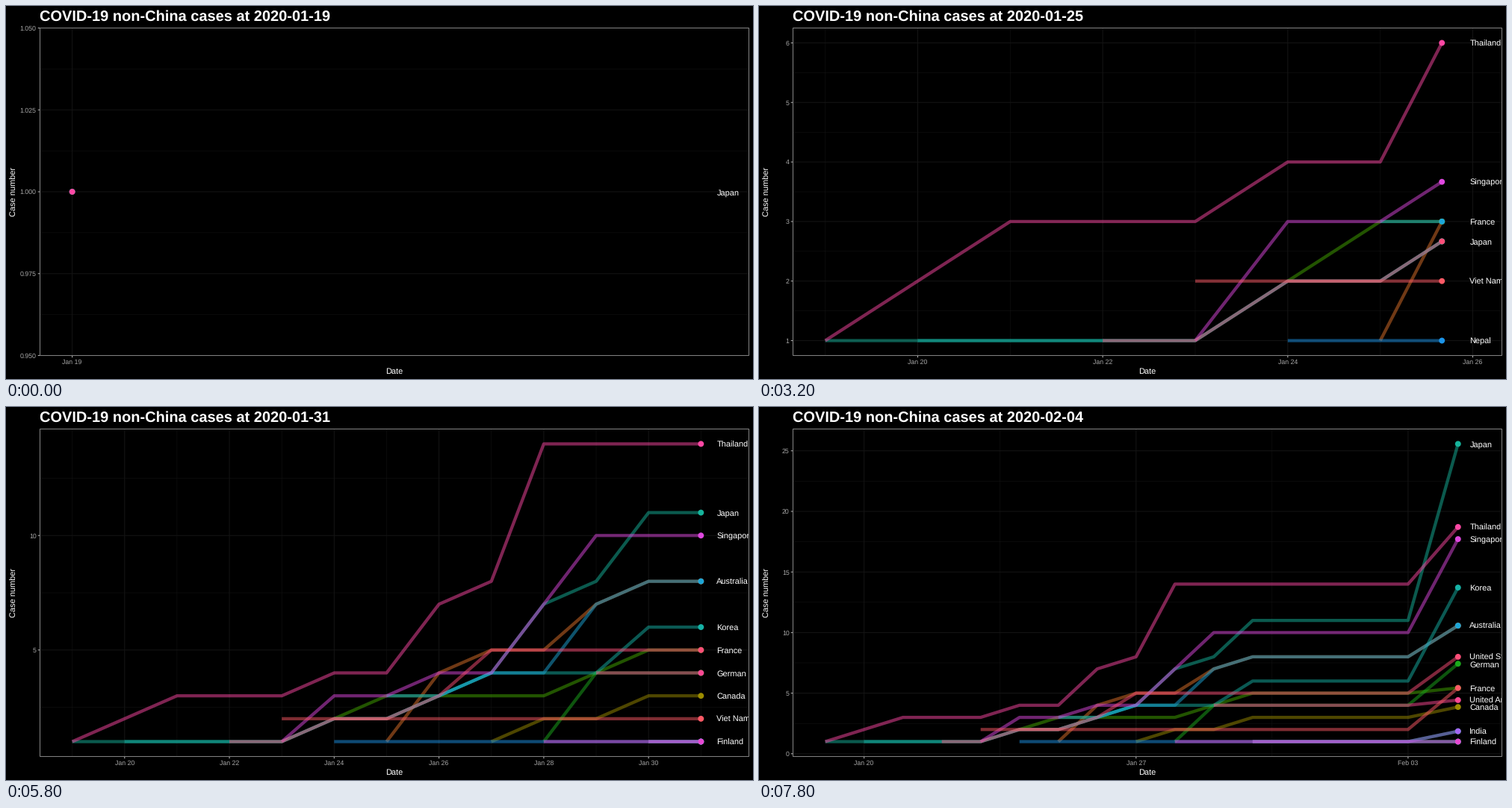
Recreate the animation shown at these times as a matplotlib script. Size 1000 by 500 pixels, loop 8000 ms.

```python
import math
from itertools import count

import matplotlib.pyplot as plt
import numpy as np
from matplotlib.animation import FuncAnimation
from matplotlib.patches import Circle, Rectangle

plt.rcParams["font.family"] = "Liberation Sans"
plt.rcParams["text.hinting"] = "no_hinting"

W, H = 1000, 500
LEFT, RIGHT, TOP, BOTTOM = 45.5, 994.5, 29.5, 468.5
PX = 0.72               # points per pixel at 100 dpi
THIN = 1.07             # pixel width of border, ticks and major grid
FRAMES, INTERVAL = 40, 200
PER_DAY = 99 / 41       # animation frames per day
HOLD, LAST = 15, 18     # counts stay flat until HOLD, next report on LAST
LABEL_GAP = 0.3         # days between the newest point and its label

# name: colour, first day after Jan 19, daily counts, count on LAST
COUNTRIES = {
    "Australia": ("#e0722a", 6, [1, 4, 5, 5, 7, 8], 14),
    "Canada": ("#9c8c00", 8, [1, 2, 2, 3], 5),
    "Finland": ("#55a000", 11, [1], 1),
    "France": ("#45a800", 5, [2, 3, 3, 3, 3, 4, 5], 6),
    "German": ("#1caa1c", 9, [1, 4], 12),
    "India": ("#14b06c", 11, [1], 3),
    "Japan": ("#16b49c", 0, [1, 1, 1, 1, 1, 2, 2, 3, 4, 7, 8, 11], 45),
    "Korea": ("#16b2a6", 1, [1, 1, 1, 1, 2, 2, 3, 4, 4, 4, 6], 24),
    "Malaysia": ("#1ca6d8", 6, [3, 3, 4, 4, 7, 8], 14),
    "Nepal": ("#1c94e8", 5, [1], 1),
    "Philippines": ("#a566f5", 11, [1], 3),
    "Singapore": ("#df48e0", 4, [1, 3, 3, 4, 4, 7, 10], 28),
    "Sri Lanka": ("#e648d2", 9, [1], 1),
    "Thailand": ("#ff48a4", 0, [1, 2, 3, 3, 3, 4, 4, 7, 8, 14], 25),
    "United Arab Emirates": ("#ff4894", 10, [4], 5),
    "United States": ("#ff4e78", 3, [1, 1, 2, 2, 3, 5], 12),
    "Viet Nam": ("#ff5a66", 4, [2], 10),
}
# Australia gives way to these when labels collide
FIRST_LABELS = ["Finland", "France", "German", "India", "Japan", "Korea"]
LABEL_ORDER = FIRST_LABELS + [n for n in COUNTRIES if n not in FIRST_LABELS]

KEY_DAYS = list(range(HOLD + 1)) + [LAST]
KEY_FRAMES = [round(d * PER_DAY) for d in KEY_DAYS]


def series(start, counts, final):
    days = list(range(start, HOLD + 1)) + [LAST]
    held = counts + [counts[-1]] * (len(days) - 1 - len(counts))
    return np.array(days, float), np.array(held + [final], float)


SERIES = {n: series(*spec[1:]) for n, spec in COUNTRIES.items()}


def nice_breaks(lo, hi, m=5):
    """Extended Wilkinson axis labelling."""
    qs = (1, 5, 2, 2.5, 4, 3)
    span = hi - lo
    best, result = -2.0, None

    def score(simple, cover, dense):
        return 0.25 * simple + 0.2 * cover + 0.5 * dense + 0.05

    for j in count(1):
        for i, q in enumerate(qs):
            base = 1 - i / (len(qs) - 1) - j
            if score(base + 1, 1, 1) < best:
                return result
            for k in count(2):
                dense_max = 2 - (k - 1) / (m - 1) if k >= m else 1
                if score(base + 1, 1, dense_max) < best:
                    break
                for z in count(math.ceil(math.log10(span / (k + 1) / j / q))):
                    step = j * q * 10.0 ** z
                    width = step * (k - 1)
                    extra = max(0, width - span) / 2
                    cover_max = 1 - extra ** 2 / (0.1 * span) ** 2
                    if score(base + 1, cover_max, dense_max) < best:
                        break
                    first = math.floor(hi / step) * j - (k - 1) * j
                    for start in range(first, math.ceil(lo / step) * j + 1):
                        a = start * step / j
                        b = a + width
                        zero = start % j == 0 and a <= 0 <= b
                        cover = 1 - 0.5 * ((hi - b) ** 2 + (lo - a) ** 2) / (0.1 * span) ** 2
                        ratio = (k - 1) / width * (max(b, hi) - min(a, lo)) / (m - 1)
                        s = score(base + zero, cover, 2 - max(ratio, 1 / ratio))
                        if s > best:
                            best, result = s, [a + step * n for n in range(k)]


def number_labels(values):
    digits = next(d for d in range(6)
                  if all(abs(round(v, d) - v) < 1e-6 for v in values))
    return [f"{v:.{digits}f}" for v in values]


def day_breaks(hi):
    step = 1 if hi <= 5 else 2 if hi <= 13 else 7
    first = (0 if step == 1 else 1) - step
    return [first + step * n for n in range(int(hi / step) + 4)]


def month_day(day):
    d = 19 + day
    return (1, d) if d <= 31 else (2, d - 31)


def day_label(day):
    month, d = month_day(day)
    return f"{('Jan', 'Feb')[month - 1]} {d:02d}"


def midpoints(breaks):
    half = (breaks[1] - breaks[0]) / 2
    return [breaks[0] - half] + [b + half for b in breaks]


fig = plt.figure(figsize=(W / 100, H / 100), dpi=100, facecolor="black")
ax = fig.add_axes([0, 0, 1, 1])
panel = Rectangle((LEFT / W, 1 - BOTTOM / H), (RIGHT - LEFT) / W, (BOTTOM - TOP) / H,
                  transform=fig.transFigure)


def line(xs, ys, color, width=THIN, **kw):
    ax.plot(xs, ys, color=color, lw=width * PX, solid_capstyle="butt",
            solid_joinstyle="round", snap=False, **kw)


def text(x, y, s, size, color="white", **kw):
    return ax.text(x, y, s, fontsize=size * PX, color=color, va="baseline", **kw)


def draw_axes(xpix, ypix, xbreaks, ybreaks):
    def in_x(v):
        return LEFT - 0.01 <= xpix(v) <= RIGHT + 0.01

    def in_y(v):
        return TOP - 0.01 <= ypix(v) <= BOTTOM + 0.01

    for marks, width in ((midpoints, THIN / 2), (list, THIN)):
        for v in filter(in_y, marks(ybreaks)):
            line([LEFT, RIGHT], [ypix(v)] * 2, "#141414", width, zorder=1)
        for v in filter(in_x, marks(xbreaks)):
            line([xpix(v)] * 2, [TOP, BOTTOM], "#141414", width, zorder=1)

    for v, label in zip(ybreaks, number_labels(ybreaks)):
        if in_y(v):
            line([LEFT - 2.75, LEFT], [ypix(v)] * 2, "#b3b3b3", zorder=6)
            text(40.6, ypix(v) + 3.3, label, 8.8, "#a8a8a8", ha="right")
    for v in filter(in_x, xbreaks):
        line([xpix(v)] * 2, [BOTTOM, BOTTOM + 2.75], "#b3b3b3", zorder=6)
        text(xpix(v), 480, day_label(v), 8.8, "#a8a8a8", ha="center")

    ax.add_patch(Rectangle((LEFT, TOP), RIGHT - LEFT, BOTTOM - TOP, fill=False,
                           ec="#7f7f7f", lw=THIN * PX, snap=False, zorder=6))
    text((LEFT + RIGHT) / 2, 493, "Date", 11, ha="center")
    text(14, (TOP + BOTTOM) / 2, "Case number", 11, ha="center",
         rotation=90, rotation_mode="anchor")


def draw(frame):
    ax.clear()
    ax.set(xlim=(0, W), ylim=(H, 0))
    ax.axis("off")

    now = float(np.interp(frame, KEY_FRAMES, KEY_DAYS))
    paths = {}
    for name, (days, counts) in SERIES.items():
        if days[0] <= now:
            past = days < now
            paths[name] = (np.append(days[past], now),
                           np.append(counts[past], np.interp(now, days, counts)))

    lo = min(ys.min() for _, ys in paths.values())
    hi = max(ys.max() for _, ys in paths.values())
    if lo == hi:
        lo, hi = lo - 0.05, hi + 0.05
        pad = 0
    else:
        pad = (hi - lo) * 0.05
    xmax = now + LABEL_GAP

    def xpix(d):
        return LEFT + (RIGHT - LEFT) * (d / xmax + 0.05) / 1.1

    def ypix(v):
        return BOTTOM - (BOTTOM - TOP) * (v - lo + pad) / (hi - lo + 2 * pad)

    draw_axes(xpix, ypix, day_breaks(xmax), nice_breaks(lo, hi))

    for name, (xs, ys) in paths.items():
        color = COUNTRIES[name][0]
        if len(xs) > 1:
            line(xpix(xs), ypix(ys), color, 4.27, alpha=0.5, zorder=3)
        ax.add_patch(Circle((xpix(now), ypix(ys[-1])), 3.95, color=color, lw=0,
                            snap=False, zorder=4))

    used = []
    for name in LABEL_ORDER:
        if name not in paths:
            continue
        y = ypix(paths[name][1][-1])
        if all(abs(y - other) > 8 for other in used):
            used.append(y)
            label = text(xpix(xmax), y + 4.3, name, 11, zorder=5, clip_on=True)
            label.set_clip_path(panel)

    month, day = month_day(int(now + 1e-6))
    text(45, 20, f"COVID-19 non-China cases at 2020-{month:02d}-{day:02d}", 20,
         weight="bold")
    return []


anim = FuncAnimation(fig, draw, frames=FRAMES, interval=INTERVAL, repeat=True,
                     repeat_delay=0, init_func=lambda: draw(0))
plt.show()
```
